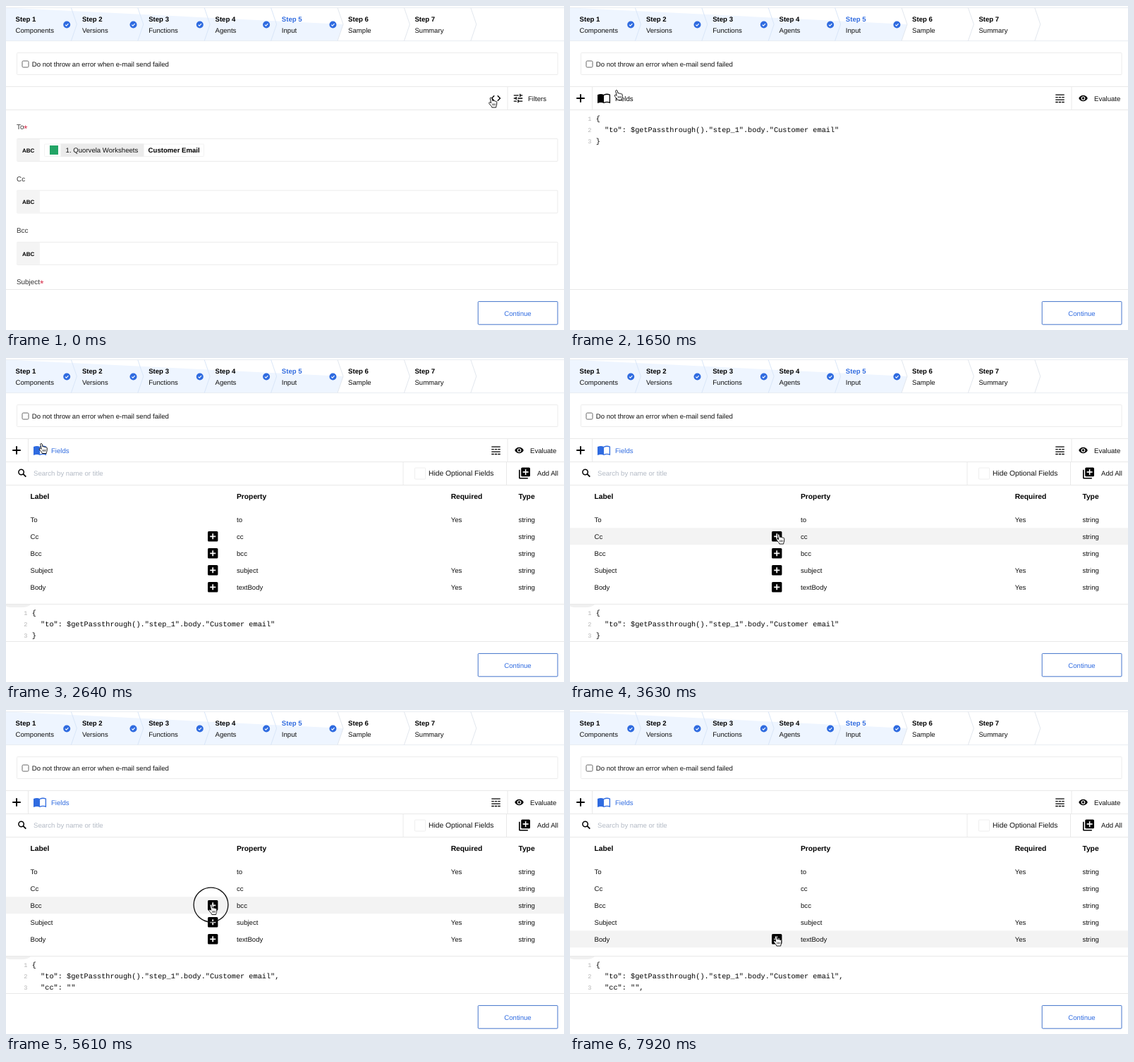
An HTML page for the animation above (8 s loop, 791x460 px).

```html
<!DOCTYPE html>
<html lang="en">
<head>
<meta charset="utf-8">
<title>Field mapping editor</title>
<style>
html, body { margin: 0; width: 100%; height: 100%; overflow: hidden; background: #fff; }
svg { display: block; width: 100%; height: 100%; }
text { font: 9.6px "Liberation Sans", Arial, sans-serif; text-rendering: geometricPrecision; white-space: pre; }
.bold { font-weight: 700; }
.big { font-size: 10.27px; }
.label { font-size: 9.9px; }
.abc { font-size: 8px; font-weight: 700; }
.code { font: 10.25px "Liberation Mono", "Courier New", monospace; }
.num { font: 8.6px "Liberation Mono", "Courier New", monospace; text-anchor: end; }
.star { font-size: 14px; }
.mid { text-anchor: middle; }
</style>
</head>
<body>
<svg id="stage" viewBox="0 0 791 460"></svg>
<script>
const LOOP = 8000, STEP = 330;
const BLUE = '#2f6be0', LINE = '#e9e9e9';
const stage = document.getElementById('stage');

// Pointer per step: kind, tip x, tip y, click ring
const POINTER = [
  ['hand', 687.5, 130], ['hand', 687.5, 130, 1], ['hand', 687.5, 130],
  ['arrow', 222, 122], ['arrow', 172, 120], ['hand', 66, 119.5],
  ['hand', 50, 121.5], ['hand', 50, 121.5, 1], ['hand', 50, 121.5], ['hand', 50, 121.5],
  ['arrow', 236, 229], ['hand', 295.5, 250], ['hand', 295.5, 250], ['hand', 295.5, 250, 1],
  ['hand', 295.5, 250], ['arrow', 294, 256], ['hand', 290.5, 276.5], ['hand', 290.5, 276.5, 1],
  ['arrow', 291, 277], ['arrow', 292, 284], ['hand', 291, 297], ['hand', 291, 297, 1],
  ['arrow', 290.5, 298], ['arrow', 292.5, 314], ['hand', 291.5, 321]
];
const CODE_VIEW = 2, PANEL_OPEN = 8, ROW_HOVER = 10, CC_ADDED = 14, BCC_ADDED = 18;

// label, property, required, step at which its add button vanishes
const FIELDS = [
  ['To', 'to', true, 0], ['Cc', 'cc', false, 15], ['Bcc', 'bcc', false, 18],
  ['Subject', 'subject', true, 22], ['Body', 'textBody', true, 99]
];

const ICONS = {
  code: 'M9.4 16.6L4.8 12l4.6-4.6L8 6l-6 6 6 6zm5.2 0l4.6-4.6-4.6-4.6L16 6l6 6-6 6z',
  tune: 'M3 17v2h6v-2zM3 5v2h10V5zm10 16v-2h8v-2h-8v-2h-2v6zM7 9v2H3v2h4v2h2V9zm14 4v-2H11v2zm-6-4h2V7h4V5h-4V3h-2z',
  eye: 'M12 4.5C7 4.5 2.7 7.6 1 12c1.7 4.4 6 7.5 11 7.5s9.3-3.1 11-7.5c-1.7-4.4-6-7.5-11-7.5zM12 17a5 5 0 1 1 0-10 5 5 0 0 1 0 10zm0-8a3 3 0 1 0 0 6 3 3 0 0 0 0-6z',
  addAll: 'M4 6H2v14c0 1.1.9 2 2 2h14v-2H4zM20 2H8c-1.1 0-2 .9-2 2v12c0 1.1.9 2 2 2h12c1.1 0 2-.9 2-2V4c0-1.1-.9-2-2-2zm-1 9h-4v4h-2v-4H9V9h4V5h2v4h4z',
  lines: 'M3 4h18v2H3zM3 9h5v2H3zM9.5 9h5v2h-5zM16 9h5v2h-5zM3 14h18v2H3zM3 19h5v2H3zM9.5 19h5v2h-5zM16 19h5v2h-5z'
};

const text = (x, y, s, cls = '', fill = '#111') => `<text x="${x}" y="${y}" class="${cls}" fill="${fill}">${s}</text>`;
const rect = (x, y, w, h, fill, stroke = 'none', r = 0) =>
  `<rect x="${x}" y="${y}" width="${w}" height="${h}" rx="${r}" fill="${fill}" stroke="${stroke}"/>`;
const path = (d, stroke, width = 1, fill = 'none') => `<path d="${d}" stroke="${stroke}" stroke-width="${width}" fill="${fill}"/>`;
const hline = y => path(`M0 ${y}H791`, LINE);
const vline = (x, y1, y2) => path(`M${x} ${y1}V${y2}`, LINE);
const icon = (name, cx, cy, k = .69) =>
  `<path d="${ICONS[name]}" transform="translate(${cx - 12 * k} ${cy - 12 * k}) scale(${k})"/>`;

function header() {
  const names = ['Components', 'Versions', 'Functions', 'Agents', 'Input', 'Sample', 'Summary'];
  const edge = i => 92.4 + 94.4 * i;
  const chevron = x => `${x} 2.5L${x + 8} 26L${x} 49.5`;
  let s = path(`M0 2.5H${chevron(edge(4))}H0Z`, 'none', 0, '#eef5ff') + path('M0 2.5H791M0 49.5H791', '#e9edf2');
  names.forEach((name, i) => {
    const x = 13.6 + 94.3 * i, cx = 86.2 + 94.3 * i;
    s += path('M' + chevron(edge(i)), i < 4 ? '#d9e6f8' : '#e2e7ee');
    s += text(x, 21.6, 'Step ' + (i + 1), 'bold', i === 4 ? BLUE : '#000') + text(x, 37.8, name);
    if (i < 5) s += `<circle cx="${cx}" cy="26.5" r="5" fill="${BLUE}"/>` +
      path(`M${cx - 2.2} 26.6l1.6 1.6 2.8-3`, '#fff', 1.1);
  });
  return s;
}

function frame() {
  return header() +
    rect(15.5, 66.5, 766.5, 31, '#fff', '#ececec', 1) +
    rect(23, 78, 9, 9, '#fff', '#666', 1.5) +
    text(36.8, 86, 'Do not throw an error when e-mail send failed') +
    hline(114.5) + hline(147.5) + vline(711, 115, 147) +
    rect(0, 402, 791, 58, '#fff') + hline(402.5) +
    rect(669.2, 419.6, 112.8, 32.6, '#fff', '#4474cc', 1) +
    text(725.5, 439.6, 'Continue', 'mid', BLUE);
}

function form() {
  let s = icon('code', 694.5, 131) + icon('tune', 726, 131) + text(740, 134.5, 'Filters');
  ['To', 'Cc', 'Bcc', 'Subject'].forEach((name, i) => {
    const y = 188.5 + 73.4 * i;
    s += text(15, y - 13.3, name, 'label', '#333');
    if (i % 3 === 0) s += text(i ? 48 : 25, y - 10, '*', 'star', '#d8344f');
    if (i < 3) s += rect(15.5, y, 766.5, 32, '#fff', '#ebebeb', 1) + rect(15, y + .5, 33, 31, '#f4f4f4') +
      text(31.6, y + 19.3, 'ABC', 'abc mid', '#000');
  });
  return s + rect(54.5, 196, 226, 17.5, '#fff', '#f2f2f2', 1) + rect(77.5, 195.5, 118, 18.5, '#ebebeb') +
    rect(62, 198, 12, 13, '#23a566') + text(84.6, 208, '1. Quorvela Worksheets') +
    text(201.6, 208, 'Customer Email', 'bold', '#000');
}

function editor(step, y) {
  const added = step >= CC_ADDED;
  const lines = ['{', '  "to": $getPassthrough()."step_1".body."Customer email"' + (added ? ',' : ''),
    added ? '  "cc": ""' + (step >= BCC_ADDED ? ',' : '') : '}'];
  return lines.map((line, i) =>
    text(30.5, y + 16 * i, i + 1, 'num', '#b5b5b5') + text(36.8, y + 16 * i, line, 'code', '#000')).join('');
}

function codeTools(open) {
  const color = open ? BLUE : '#000';
  return path('M9.2 131H20.8M15 125.2V136.8', '#000', 2) + vline(31.5, 115, 147) +
    path('M39 126Q44 124 48 126V138Q44 136 39 138Z', 'none', 0, color) +
    path('M48 126.3Q52 124.4 56.4 126V137.2Q52 135.6 48 137.4', color, 1.3) +
    text(64, 134.5, 'Fields', '', color) +
    icon('lines', 694.5, 131) + icon('eye', 727.5, 131, .57) + text(743, 134.5, 'Evaluate');
}

function panel(step) {
  const hovered = step >= ROW_HOVER ? Math.floor((POINTER[step][2] - 217.5) / 24) : -1;
  let s = '<circle cx="21.6" cy="162" r="3.7" fill="none" stroke="#000" stroke-width="1.5"/>' +
    path('M24.3 164.7L28.3 168.7', '#000', 1.8) +
    text(39, 167, 'Search by name or title', '', '#b3bac5') +
    vline(563, 148, 180) + vline(709.5, 148, 180) + rect(579.5, 156, 15, 16, '#fff', '#efefef', 1) +
    text(599, 167.3, 'Hide Optional Fields', 'big') + icon('addAll', 735, 163.5, .8) +
    text(753, 167, 'Add All') + hline(180.5) + hline(349.5) +
    path('M0 350H35Q31 354 22 354H8Q2 354 0 352Z', 'none', 0, '#f0f0f0');
  [[34.5, 'Label'], [327, 'Property'], [630.7, 'Required'], [726.4, 'Type']].forEach(([x, name]) =>
    s += text(x, 199.8, name, 'big bold', '#000'));
  FIELDS.forEach(([label, property, required, gone], i) => {
    const mid = 229.3 + 24 * i, y = mid + 3.5;
    if (i === hovered) s += rect(0, mid - 12, 791, 24, '#f3f3f3');
    s += text(34.5, y, label) + text(327, y, property) + text(726.4, y, 'string');
    if (required) s += text(630.7, y, 'Yes');
    if (step < gone) s += rect(286, mid - 7.3, 14.4, 14.4, '#000', 'none', 1.5) +
      path(`M289.2 ${mid}h8m-4-4v8`, '#fff', 1.7);
  });
  return s;
}

function pointer([kind, x, y, click]) {
  const shape = kind === 'arrow'
    ? path('M0 0V11.2L2.6 8.8 4.3 12.6 6.3 11.7 4.7 8H8.2Z', '#fff', .8, '#000')
    : path('M-1.3 1C-1.3-.3 1-.3 1.3 1L2 4.6C2.6 3.8 4 4 4.3 5 5 4.3 6.2 4.6 6.4 5.6 7.2 5 8.3 5.4 8.3 6.6L8.1 10C8 11.5 7.2 12 7.2 14H1.4C1 12-1.2 10.6-2.5 8.6-3.4 7-2 6.2-.8 7L.2 7.8Z', '#000', .9, '#fff') +
      path('M2.2 8.5V11.3M4 8.5V11.3M5.8 8.5V11.3', '#000', .7);
  const ring = click ? '<circle r="24.4" fill="none" stroke="#111" stroke-width="1.3"/>' : '';
  return `<g transform="translate(${x} ${y})">${shape}${ring}</g>`;
}

function scene(step) {
  if (step < CODE_VIEW) return form() + frame() + pointer(POINTER[step]);
  const open = step >= PANEL_OPEN;
  return editor(step, open ? 365 : 162.8) + frame() + codeTools(open) + (open ? panel(step) : '') + pointer(POINTER[step]);
}

let shown = -1;
function tick() {
  const step = Math.floor(performance.now() % LOOP / STEP);
  if (step !== shown) stage.innerHTML = scene(shown = step);
  requestAnimationFrame(tick);
}
tick();
</script>
</body>
</html>
```
